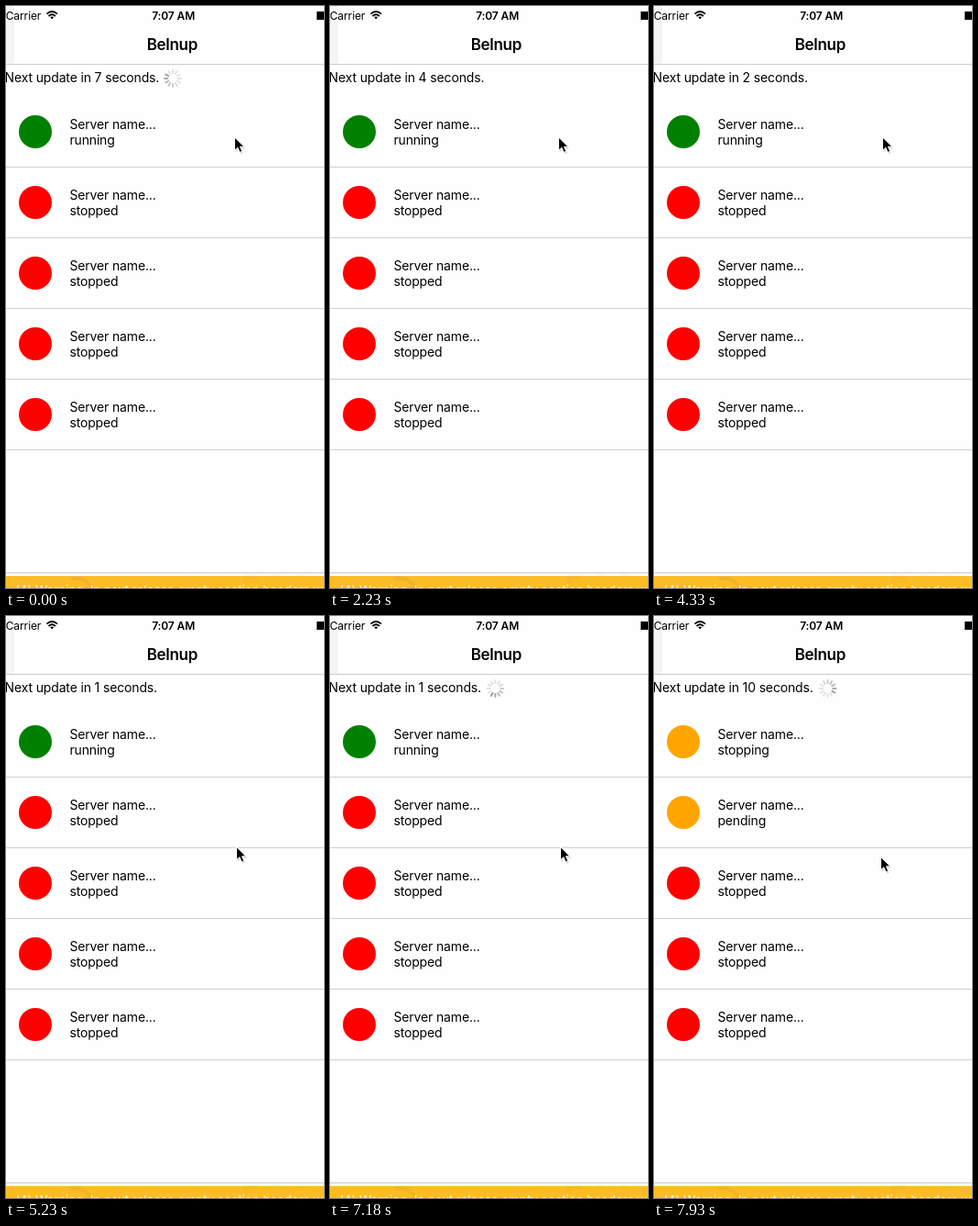
Animation of 347 by 634 pixels, one loop 8 s. Source, as an HTML page:

```html
<!DOCTYPE html>
<html lang="en">
<head>
<meta charset="utf-8">
<title>Server list</title>
<style>
  html, body { margin: 0; width: 100%; height: 100%; overflow: hidden; background: #fefefe; }
  svg { display: block; width: 347px; height: 634px; }
  text { font: 14px Inter, Roboto, sans-serif; letter-spacing: -.15px; fill: #000; white-space: pre; }
  .small { font-size: 12px; letter-spacing: -.1px; }
  .clock { font-size: 12px; font-weight: 600; letter-spacing: -.1px; }
  .title { font-size: 17px; font-weight: 600; letter-spacing: -.3px; }
  .warning { font-size: 13.5px; letter-spacing: -.1px; fill: #fff; fill-opacity: .9; }
</style>
</head>
<body>
<svg id="stage" viewBox="0 0 347 634">
  <rect width="347" height="634" fill="#fefefe"/>
  <rect width="9" height="63" fill="#f5f5f5"/>
  <rect y="63" width="347" height="1" fill="#cbcbcb"/>

  <text class="small" x="-.3" y="15">Carrier</text>
  <g fill="none" stroke="#000" stroke-width="1.8">
    <path d="M44.4 8.6Q50.2 3.4 56 8.6M46.5 11Q50.2 7.6 53.9 11"/>
    <path d="M48.3 12.2Q50.2 10.7 52.1 12.2L50.2 14.4Z" fill="#000" stroke="none"/>
  </g>
  <text class="clock" x="182.7" y="15" text-anchor="middle">7:07 AM</text>
  <rect x="339" y="6" width="8" height="9"/>
  <text class="title" x="181.3" y="48" text-anchor="middle">Belnup</text>

  <text id="countdown" x="-1.4" y="83"></text>
  <g id="spinner" stroke-width="2" stroke-linecap="round"></g>
  <g id="rows"></g>

  <rect y="617" width="347" height="1" fill="#cbcbcb"/>
  <rect y="618" width="347" height="3" fill="#f8f8f8"/>
  <g fill="#f3f3f3">
    <rect x="259" y="619" width="16" height="2"/>
    <rect x="290" y="619" width="10" height="2"/>
    <rect x="317" y="619" width="10" height="2"/>
  </g>
  <rect y="621" width="347" height="13" fill="#fcbc25"/>
  <path d="M71 624Q84 620 94 634" fill="none" stroke="#efb32c" stroke-width="4"/>
  <path d="M259 621h16v3h-11v5h-5z" fill="#f7b828"/>
  <text class="warning" x="10" y="641">(4) Warning: In next release empty section headers will be</text>

  <g id="cursor">
    <path d="M1 2V16L4.3 13L6.6 18L9.2 17L7 12H11.5Z" fill="#000" opacity=".18"/>
    <path d="M0 0V14.2L3.3 11.2L5.6 16.4L8.2 15.3L6 10.3H10.4Z" stroke="#fff" stroke-width="1"/>
  </g>
</svg>
<script>
const LOOP = 8000;
const SVG = "http://www.w3.org/2000/svg";
const byId = id => document.getElementById(id);

function add(parent, tag, attrs, text = "") {
  const node = document.createElementNS(SVG, tag);
  for (const key in attrs) node.setAttribute(key, attrs[key]);
  node.textContent = text;
  parent.append(node);
  return node;
}

const rows = Array.from({ length: 5 }, (_, i) => {
  const g = add(byId("rows"), "g", { transform: `translate(0 ${i * 77})` });
  add(g, "text", { x: 69.4, y: 134 }, "Server name...");
  add(g, "rect", { y: 175, width: 347, height: 1, fill: "#d0d0d0" });
  return {
    dot: add(g, "circle", { cx: 32, cy: 137, r: 18 }),
    label: add(g, "text", { x: 69.4, y: 151 })
  };
});

const spokes = Array.from({ length: 12 }, (_, i) =>
  add(byId("spinner"), "line", { y1: -9, y2: -5.7, transform: `rotate(${i * 30})` }));

const colors = { running: "#008000", stopped: "#ff0000", stopping: "#ffa500", pending: "#ffa500" };

// Each entry is [start time, value...], held until the next one.
const counts = [[0, 7], [290, 6], [1190, 5], [2230, 4], [3280, 3], [4330, 2], [5230, 1], [7330, 10]];
const pointer = [[0, 249.5, 143], [4630, 249.5, 174.5], [4780, 251.5, 251.5], [7930, 247.5, 262.5]];
const spinnerX = [[0, 182], [290, null], [6280, 180.3], [7330, 189.5]];
// Spinner position in spokes, advancing twelve per second from each start.
const spinnerTurn = [[0, 10.5], [6280, 8.7]];
const SPINNER_STEP = 150;

const entryAt = (track, t) => track.findLast(step => step[0] <= t);
const at = (track, t) => entryAt(track, t).slice(1);

function drawSpinner(t) {
  const [x] = at(spinnerX, t);
  byId("spinner").style.display = x === null ? "none" : "";
  if (x === null) return;
  byId("spinner").setAttribute("transform", `translate(${x} 79)`);
  const [start, phase] = entryAt(spinnerTurn, t);
  const elapsed = Math.floor((t - start) / SPINNER_STEP) * SPINNER_STEP;
  const head = Math.floor(phase + elapsed * .012) % 12;
  spokes.forEach((spoke, i) => {
    const age = (head - i + 12) % 12;
    const shade = Math.min(226, 158 + age * 12);
    spoke.setAttribute("stroke", `rgb(${shade},${shade},${shade})`);
  });
}

function draw(t) {
  byId("countdown").textContent = `Next update in ${at(counts, t)[0]} seconds.`;
  byId("cursor").setAttribute("transform", `translate(${at(pointer, t)})`);
  drawSpinner(t);
  const states = t < 7330 ? ["running"] : ["stopping", "pending"];
  rows.forEach(({ dot, label }, i) => {
    const state = states[i] || "stopped";
    dot.setAttribute("fill", colors[state]);
    label.textContent = state;
  });
}

const start = performance.now();
function frame() {
  draw((performance.now() - start) % LOOP);
  requestAnimationFrame(frame);
}
draw(0);
requestAnimationFrame(frame);
</script>
</body>
</html>
```
